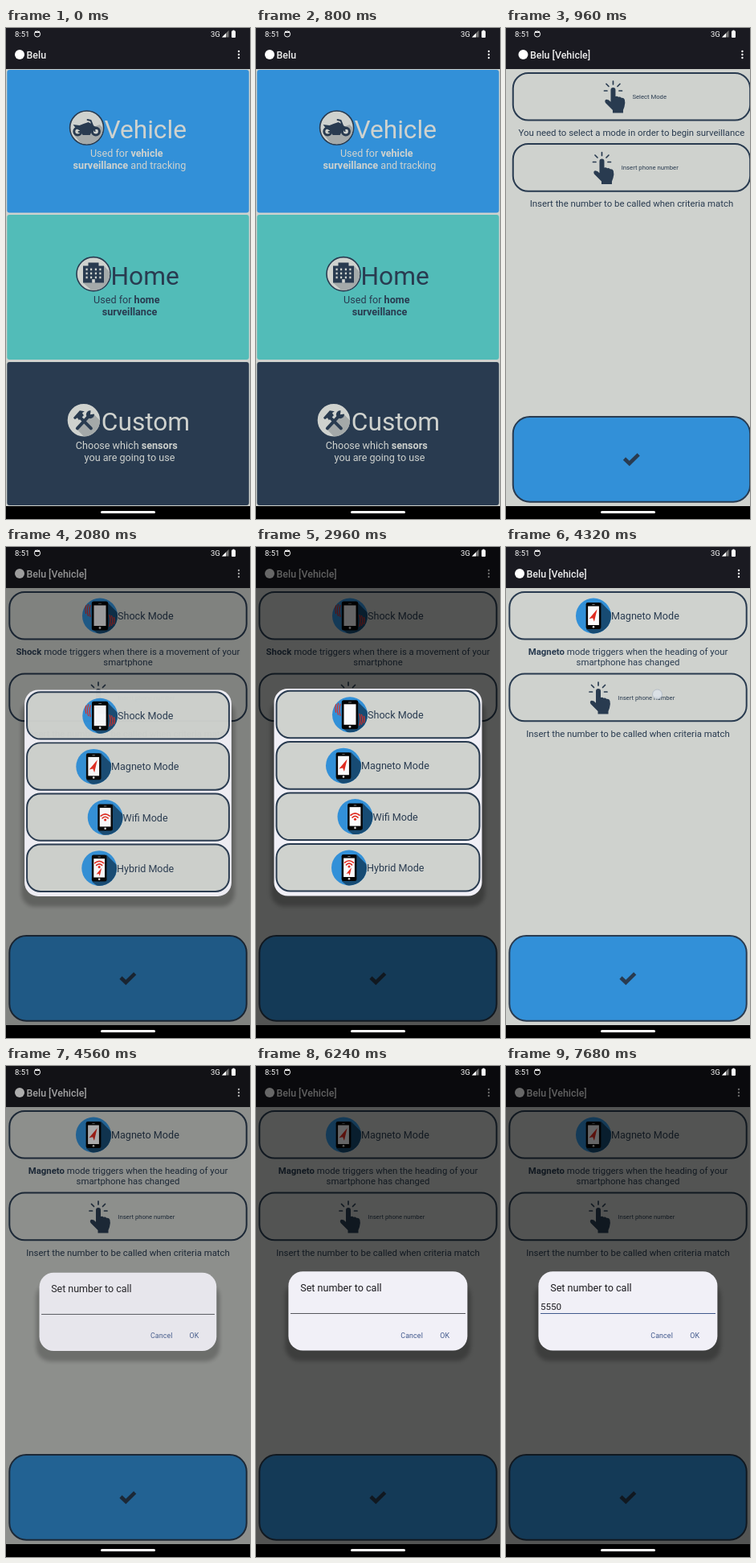
Recreate the animation shown at these times as an HTML page. Size 304 by 610 pixels, loop 8000 ms.

```html
<!DOCTYPE html>
<html lang="en">
<head>
<meta charset="utf-8">
<title>Surveillance app walkthrough</title>
<style>
html, body { margin: 0; width: 100%; height: 100%; overflow: hidden; background: #000; }
svg { display: block; width: 304px; height: 610px; }
text { font-family: Roboto, sans-serif; font-size: 12.6px; white-space: pre; }
.title { font-size: 31.7px; }
.note { font-size: 11.38px; fill: #293b50; text-anchor: middle; }
.hint { font-size: 7.7px; fill: #293b50; }
.action { font-size: 8.9px; fill: #40588c; letter-spacing: .1px; }
.mid { text-anchor: middle; }
.b { font-weight: 700; }
.line { fill: none; stroke-linecap: round; stroke-linejoin: round; }
</style>
</head>
<body>
<svg id="stage" viewBox="0 0 304 610"></svg>
<script>
const NAVY = '#293b50', BLUE = '#3290d8', TEAL = '#52bcb8', PAPER = '#cfd2ce', RED = '#e02b20', BAR = '#1a1a21';
const APP = 'Belu', DIGITS = '5550';

const rect = (x, y, w, h, r, fill, extra = '') =>
  `<rect x="${x}" y="${y}" width="${w}" height="${h}" rx="${r}" fill="${fill}" ${extra}/>`;
const text = (x, y, str, cls = '', fill = NAVY) => `<text x="${x}" y="${y}" class="${cls}" fill="${fill}">${str}</text>`;
const path = (d, fill) => `<path d="${d}" fill="${fill}"/>`;
const line = (d, color, width) => `<path d="${d}" class="line" stroke="${color}" stroke-width="${width}"/>`;
const at = (x, y, body, scale = 1) => `<g transform="translate(${x} ${y}) scale(${scale})">${body}</g>`;
const bold = str => `<tspan class="b">${str}</tspan>`;
const outlined = (x, y, w, h, r, fill) => rect(x, y, w, h, r, fill, `stroke="${NAVY}" stroke-width="2"`);

// Round card icons, centred on 0,0
const disc = body => `<circle r="21" fill="${PAPER}" stroke="${NAVY}" stroke-width="1.6"/>
  <g clip-path="url(#disc)">${body}</g>`;
const shade = d => path(d, '#a4a9a9');
const bike = disc(shade('M-16 9 16-4 40 20 10 40Z') +
  [-11.3, 11.3].map(x => `<circle cx="${x}" cy="4.5" r="4.5" fill="${PAPER}" stroke="${NAVY}" stroke-width="3"/>`).join('') +
  path('M-17-4-9-3-4-5 2-7 6-5 8-3 13 0 16 1 11 2 6 5 4 9-5 9-8 4-14 0Z', NAVY) +
  line('M10 4 5-9 1-10M-10 5-3 5', NAVY, 2));
const building = disc(shade('M13-10 40 18 20 40-13 11Z') +
  path('M-13-10H-6.500V-14H6.500V-10H13V11H-13Z', NAVY) +
  [-9.5, -4, 1.8, 7.3].map(x => [-7, -2, 3].map(y => rect(x, y, 2.2, 2.6, 0, PAPER)).join('')).join('') +
  rect(-1.8, 6.5, 3.6, 4.5, 0, PAPER));
const tools = disc(shade('M12-8 40 20 20 40-9 11Z') +
  line('M-8 10 7-6', NAVY, 4) + line('M-5-4 9 10', NAVY, 4) +
  path('M-13-3-5-12 1-11-2-9 0-6-6 0-8-3-11-1Z', NAVY) +
  `<circle cx="8" cy="-7" r="5" fill="${NAVY}"/>` + path('M8-7 9-14 15-8Z', PAPER));

// Mode icons, centred on 0,0
const arrow = path('M5-9-6 4-1 3 1 8Z', RED);
const wifi = line('M-6-2Q0-7 6-2M-3.8 1Q0-2.5 3.8 1', RED, 1.8) + `<circle cy="3.4" r="1.7" fill="${RED}"/>`;
const waves = line('M-12-13Q-14-6-12 1M-14.500-14Q-17-6-14.500 0M-17.500-13Q-19-8-17.500-3M12-1Q14 6 12 13M14.500 0Q17 6 14.500 12M17.500 2Q19 6 17.500 10', RED, 1.2);
const phone = (inner, size = .92, outer = '') => `<circle r="22" fill="${BLUE}"/><g clip-path="url(#badge)">
  ${path('M9-17 40 14 20 40-9 17Z', '#174b73')}${outer}</g>` +
  at(0, 0, `${rect(-10.2, -18, 20.4, 36, 2.5, '#050505')}${rect(-7.5, -13, 15, 25.5, 0, '#fbfbfd')}
  ${rect(-2, -15.8, 4, 1, .5, '#777')}<circle cy="15" r="1.4" fill="#ddd"/>${inner}`, size);
const modes = {
  Shock: { x: 117, icon: phone('', 1, waves) },
  Magneto: { x: 109, icon: phone(arrow) },
  Wifi: { x: 123.5, icon: phone(wifi) },
  Hybrid: { x: 116, icon: phone(at(0, -5, wifi) + at(0, 5.5, arrow, .65)) },
};
const modeLabel = (name, y) => at(modes[name].x, y, modes[name].icon + text(22, 4.6, name + ' Mode'));

const hand = line('M12 1V5M3.5 4.5 6.5 7.5M20.5 4.5 17.5 7.5M1 13H4.5M23 13H19.5', NAVY, 1.7) +
  path('M9 12a3 3 0 0 1 6 0V20q2.2-1 3.6 .7q2.2-.8 3.6 1q3.2-.5 4.2 2.4q1.2 4-.4 9l-1.5 4V40.500H11.500V37L2.500 28q-1.800-3.500 1.200-4.200q3 0 5.300 3Z', NAVY);

const appBar = title => rect(-40, 0, 384, 51, 0, BAR) + '<circle cx="17" cy="33" r="6" fill="#fff"/>' +
  `<text x="25.500" y="38" fill="#eee" style="font-size:12.4px;font-weight:500">${title}</text>` +
  [29, 33, 37].map(y => `<circle cx="290" cy="${y}" r="1.2" fill="#fff"/>`).join('');
const backdrop = rect(-40, 51, 384, 543, 0, PAPER);

const card = (y, h, fill, ink, icon, ix, iy, title, tx, first, second) =>
  rect(1.3, y, 301.4, h, 3, fill) + at(ix, iy, icon) + text(tx, iy + 13, title, 'title', ink) +
  text(150.3, iy + 36, first, 'mid', ink) + text(154, iy + 51, second, 'mid', ink);
const home = backdrop + appBar(APP) +
  card(52, 177.5, BLUE, PAPER, bike, 100.6, 124, 'Vehicle', 122.4, 'Used for ' + bold('vehicle'), bold('surveillance') + ' and tracking') +
  card(232, 180, TEAL, NAVY, building, 109, 305.6, 'Home', 130.5, 'Used for ' + bold('home'), bold('surveillance')) +
  card(415, 178, NAVY, PAPER, tools, 96.9, 487.3, 'Custom', 118.8, 'Choose which ' + bold('sensors'), 'you are going to use');

const setup = (top, notes, insertY) => backdrop + appBar(APP + ' [Vehicle]') +
  outlined(4.3, 56, 295.4, 58.5, 19, 'none') + top +
  notes.map((s, i) => text(152, 134 + i * 13.3, s, 'note')).join('') +
  outlined(4.3, insertY, 295.4, 58.8, 19, 'none') + at(103, insertY + 9.5, hand) +
  text(139.3, insertY + 32.3, 'Insert phone number', 'hint') +
  text(152, insertY + 78, 'Insert the number to be called when criteria match', 'note') +
  outlined(4.3, 483, 295.4, 105.7, 21, BLUE) +
  `<path d="M143 535 149.300 541 160.700 529.800" fill="none" stroke="${NAVY}" stroke-width="4.6"/>`;
const selectPage = setup(at(117, 65, hand) + text(153, 88.4, 'Select Mode', 'hint'),
  ['You need to select a mode in order to begin surveillance'], 144);
const shockPage = setup(modeLabel('Shock', 85.5),
  [bold('Shock') + ' mode triggers when there is a movement of your', 'smartphone'], 157.5);
const magnetoPage = setup(modeLabel('Magneto', 85.5),
  [bold('Magneto') + ' mode triggers when the heading of your', 'smartphone has changed'], 157.5);

const sheet = (x, y, w, h, r) => rect(x - 4, y + 13, w + 8, h, r, '#000', 'opacity=".26" filter="url(#soft)"') +
  rect(x, y, w, h, r, '#f1f0f7');
const modeDialog = sheet(22.5, 176, 259, 257.5, 17) + Object.keys(modes).map((name, i) =>
  outlined(25.5, 178.7 + i * 63.4, 253, 58.6, 17, PAPER) + modeLabel(name, 208.3 + i * 63.4)).join('');
const callDialog = sheet(40.4, 255.2, 223, 98.3, 18) + text(55.2, 280, 'Set number to call', '', '#1c1b1f') +
  rect(43, 307, 218, 1, 0, '#55565c', 'id="underline"') +
  `<text id="number" x="43" y="302.700" fill="#1c1b1f" style="font-size:11.6px"></text>` +
  rect(43, 291, 1, 15, 0, '#40588c', 'id="caret"') +
  text(180.3, 337.5, 'Cancel', 'action') + text(229.3, 337.5, 'OK', 'action');

const statusBar = text(11, 11, '<tspan font-size="9.500">8:51</tspan>', '', '#fff') +
  '<circle cx="39" cy="7.500" r="3.600" fill="none" stroke="#fff"/>' + path('M36 6 36.500 3.500 39 5 41.500 3.500 42 6Z', '#fff') +
  text(255, 11, '<tspan font-size="9.500">3G</tspan>', '', '#fff') +
  path('M269 11.500 277.500 3V11.500Z', '#777') + path('M269 11.500 274 6.500V11.500Z', '#fff') +
  rect(281, 3.5, 5, 8.500, 1, '#fff') + rect(282.5, 2.7, 2, 1.5, 0, '#fff');

const layer = (id, body) => `<g id="${id}">${body}</g>`;
stage.innerHTML = `<defs>
  <clipPath id="disc"><circle r="20.200"/></clipPath><clipPath id="badge"><circle r="22"/></clipPath>
  <filter id="soft" x="-20%" y="-20%" width="140%" height="140%"><feGaussianBlur stdDeviation="2.5"/></filter></defs>` +
  layer('homeView', home) + layer('selectView', selectPage) + layer('shockView', shockPage) + layer('magnetoView', magnetoPage) +
  rect(0, 0, 304, 594, 0, '#000', 'id="dim"') + layer('modeView', modeDialog) + layer('callView', callDialog) +
  '<circle id="pointer" r="6" fill="#dde3ea" stroke="#aab4c0" stroke-width=".8"/>' + statusBar +
  rect(0, 594, 304, 16, 0, '#000') + rect(118, 600, 68, 3, 1.5, '#fff');

const el = id => document.getElementById(id);
const set = (id, opacity, transform = '') => {
  const node = el(id);
  node.setAttribute('opacity', opacity);
  node.setAttribute('transform', transform);
  node.style.display = opacity > 0 ? '' : 'none';
};
const clamp = v => Math.max(0, Math.min(1, v));
const easeOut = (v, power) => 1 - (1 - clamp(v)) ** power;
const cubic = (a, b, c, d, s) => (1 - s) ** 3 * a + 3 * (1 - s) ** 2 * s * b + 3 * (1 - s) * s * s * c + s ** 3 * d;

// Fast start, very long settle: two joined Bezier pieces
function settle(v) {
  const x = clamp(v);
  const [xs, ys] = x < 1 / 6 ? [[0, .05, .1333, 1 / 6], [0, 0, .06, .4]] : [[1 / 6, .2083, .25, 1], [.4, .82, 1, 1]];
  let lo = 0, hi = 1;
  for (let i = 0; i < 24; i++) {
    const s = (lo + hi) / 2;
    if (cubic(...xs, s) < x) lo = s; else hi = s;
  }
  return cubic(...ys, lo);
}

const LOOP = 8000, OPEN = 820, MODE_IN = 1980, MODE_OUT = 3280, CALL_IN = 4480;
const TYPED = [6400, 6640, 6880, 7120];
const TAPS = [[80, 190, 135], [1840, 186, 86], [3080, 186, 272], [4240, 188.5, 183]];

function showDialog(id, age, leaving, cx, cy) {
  const k = .9 + .1 * easeOut(age / 220, 5);
  const drop = 1 - clamp((age - 100) / 100);
  const opacity = age < 0 ? 0 : easeOut(age / 150, 3) * (1 - clamp(leaving / 150));
  set(id, opacity, `translate(${cx} ${cy + drop}) scale(${k}) translate(${-cx} ${-cy})`);
}

function draw(t) {
  const slide = settle((t - OPEN) / 450);
  const fade = clamp((t - OPEN - 50) / 83);
  set('homeView', fade < 1 ? 1 : 0, `translate(${-30.4 * slide} 0)`);
  set('selectView', t < MODE_IN - 20 ? fade : 0, `translate(${30.4 * (1 - slide)} 0)`);
  set('shockView', +(t >= MODE_IN - 20 && t < MODE_OUT));
  set('magnetoView', +(t >= MODE_OUT));

  const leaving = t - MODE_OUT;
  const modeDim = easeOut((t - MODE_IN) / 250, 2) * (1 - easeOut(leaving / 220, 2));
  set('dim', .595 * Math.max(modeDim, easeOut((t - CALL_IN) / 250, 2)));
  showDialog('modeView', t - MODE_IN, leaving, 152, 304.5);
  showDialog('callView', t - CALL_IN, 0, 152, 304.5);

  const count = TYPED.filter(time => t >= time).length;
  el('number').textContent = DIGITS.slice(0, count);
  el('underline').setAttribute('fill', t > 6300 ? '#40588c' : '#55565c');
  const lastKey = count ? TYPED[count - 1] : 6300;
  set('caret', +(t > 6300 && (t - lastKey) % 1000 < 500), `translate(${count * 6.52} 0)`);

  const tap = TAPS.find(([start]) => t >= start && t < start + 180);
  set('pointer', tap ? .85 * (1 - clamp((t - tap[0] - 110) / 70)) : 0, tap ? `translate(${tap[1]} ${tap[2]})` : '');
}

const begin = performance.now();
function tick() {
  draw((performance.now() - begin) % LOOP);
  requestAnimationFrame(tick);
}
tick();
</script>
</body>
</html>
```
